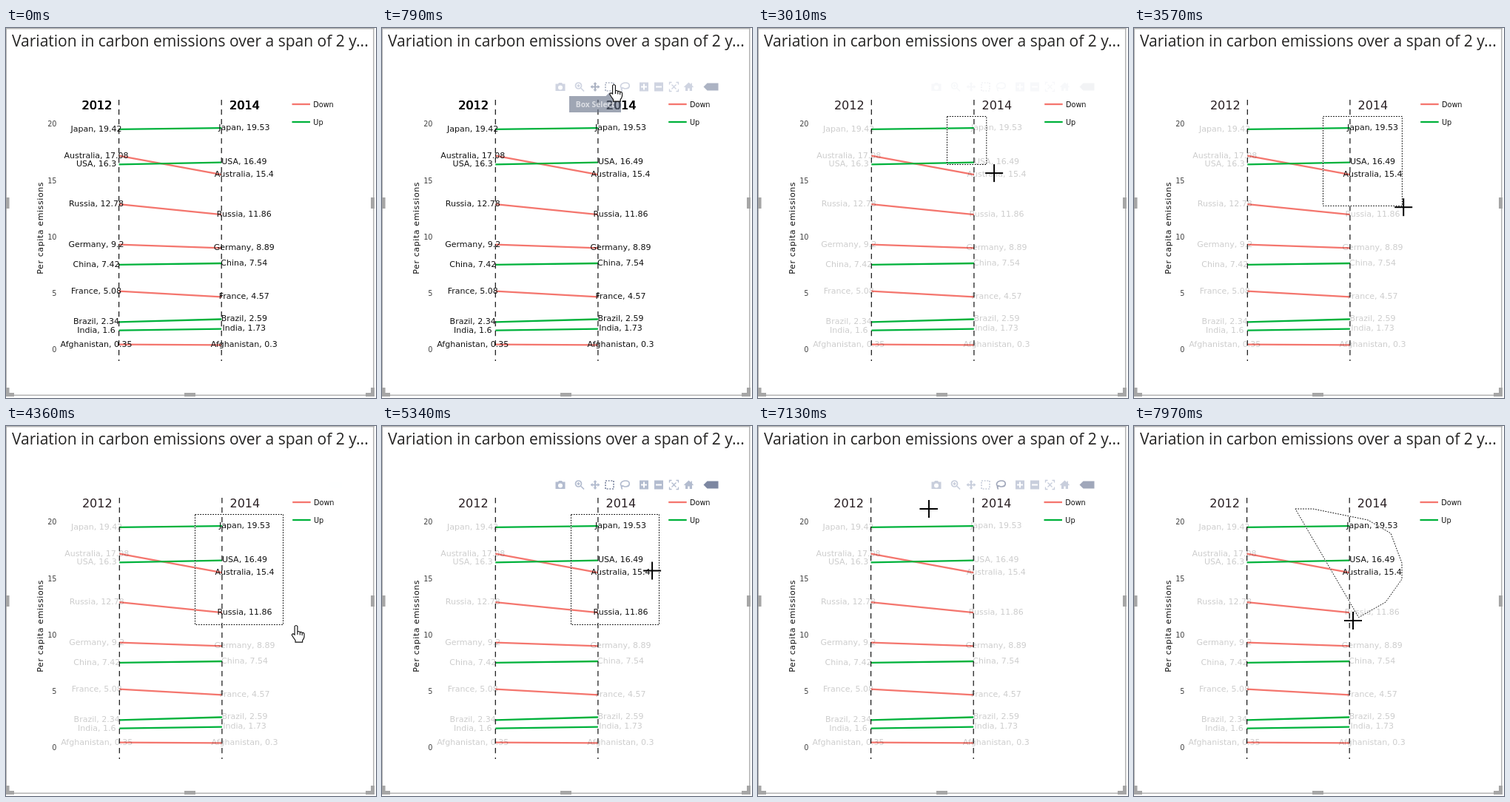
An HTML page with a canvas for the animation above (8 s loop, 500 by 500 pixels).

```html
<!DOCTYPE html>
<html lang="en">
<head>
<meta charset="utf-8">
<title>Carbon emissions</title>
<style>
  html, body { margin: 0; width: 100%; height: 100%; overflow: hidden; background: #fff; }
  canvas { display: block; width: 500px; height: 500px; }
</style>
</head>
<body>
<canvas id="stage" width="500" height="500"></canvas>
<script>
const ctx = document.getElementById('stage').getContext('2d');
const LOOP = 8000;
const RED = '#f4766e', GREEN = '#00b23c', INK = '#111';
const LEFT = 152.6, RIGHT = 291.2;
const BOX_START = 2720, RELEASE = 4360, LASSO_START = 7050;
const sans = size => `${size}px "DejaVu Sans", Verdana, sans-serif`;

const rows = [
  ['Japan', 19.42, 19.53], ['Australia', 17.08, 15.4], ['USA', 16.3, 16.49],
  ['Russia', 12.78, 11.86], ['Germany', 9.2, 8.89], ['China', 7.42, 7.54],
  ['France', 5.08, 4.57], ['Brazil', 2.34, 2.59], ['India', 1.6, 1.73],
  ['Afghanistan', 0.35, 0.3]
];

// Keyframes: time, then values
const pointer = [
  [370, 498, 40], [700, 314, 76], [2090, 314, 76], [2500, 267, 113], [BOX_START, 255, 120],
  [2880, 280, 152], [3010, 319, 196], [3300, 350, 228], [3720, 372, 250], [4030, 392.5, 269],
  [5100, 392.5, 269], [5720, 322, 80], [6380, 322, 80], [6400, 320, 81],
  [6870, 218, 112], [LASSO_START, 218, 112], [7200, 242, 112], [7400, 316, 127],
  [7540, 347, 145], [7690, 362, 185], [7770, 362, 207], [7860, 340, 238], [7970, 296, 263]
];
const barFade = [
  [0, 0], [600, 0], [900, 1], [2750, 1], [3040, 0],
  [RELEASE, 0], [4660, 1], [LASSO_START, 1], [7350, 0]
];

function track(keys, t) {
  if (t <= keys[0][0]) return keys[0].slice(1);
  const next = keys.findIndex(k => k[0] > t);
  if (next < 0) return keys[keys.length - 1].slice(1);
  const a = keys[next - 1], b = keys[next], p = (t - a[0]) / (b[0] - a[0]);
  return a.slice(1).map((v, i) => v + (b[i + 1] - v) * p);
}

const between = (t, a, b) => t >= a && t < b;
const yOf = v => 433 - 15.25 * v;

function text(str, x, y, font, color = INK, align = 'left') {
  ctx.font = font;
  ctx.fillStyle = color;
  ctx.textAlign = align;
  ctx.fillText(str, x, y);
}

function line(x1, y1, x2, y2, color, width, dash = []) {
  ctx.strokeStyle = color;
  ctx.lineWidth = width;
  ctx.setLineDash(dash);
  ctx.beginPath();
  ctx.moveTo(x1, y1);
  ctx.lineTo(x2, y2);
  ctx.stroke();
  ctx.setLineDash([]);
}

function rect(x, y, w, h, color) {
  ctx.fillStyle = color;
  ctx.fillRect(x, y, w, h);
}

function drawPanel() {
  rect(0, 0, 500, 500, '#fff');
  const edge = '#b4b4b4', grip = '#a6a6a6';
  rect(0, 0, 498, 1.5, edge);
  rect(0, 0, 1, 497, edge);
  rect(496, 0, 1.5, 497, edge);
  rect(0, 495.5, 498, 1.5, edge);
  rect(0, 229, 4.5, 15, grip);
  rect(493, 229, 5, 15, grip);
  rect(241, 493, 15, 5, grip);
  rect(0, 493, 11, 5, grip);
  rect(0, 486, 4.5, 12, grip);
  rect(486, 493, 12, 5, grip);
  rect(493, 486, 5, 12, grip);
  text('Variation in carbon emissions over a span of 2 y...', 8, 25,
    '21px "Open Sans", "Noto Sans", sans-serif', '#252423');
}

// Area picked so far by the box or lasso drag
function selection(t) {
  const path = new Path2D();
  if (between(t, BOX_START, LASSO_START)) {
    const [x, y] = track(pointer, Math.min(t, RELEASE) - 35);
    path.rect(255.5, 119.5, Math.max(0, Math.min(x, 374.5) - 255.5), Math.max(0, Math.min(y, 268.5) - 119.5));
  } else if (t >= LASSO_START) {
    const end = t - 20;
    const points = pointer.filter(k => between(k[0], LASSO_START, end)).map(k => k.slice(1));
    points.push(track(pointer, Math.max(end, LASSO_START)));
    points.forEach(([x, y]) => path.lineTo(x, y));
    path.closePath();
  }
  return path;
}

function drawChart(t) {
  const dimmed = t >= 2900;
  const lag = t >= LASSO_START ? Math.max(LASSO_START, t - 50) : t - 80;
  const picked = selection(lag);

  for (let v = 0; v <= 20; v += 5) text(v, 68.5, yOf(v) + 5.3, sans(9.7), '#444', 'right');
  ctx.save();
  ctx.translate(50.4, 270.3);
  ctx.rotate(-Math.PI / 2);
  ctx.letterSpacing = '0.6px';
  text('Per capita emissions', 0, 0, sans(11), INK, 'center');
  ctx.restore();

  ctx.save();
  const shifted = between(t, 370, 2090) || between(t, 2930, 6460);
  ctx.translate(shifted ? 0.7 : 0, 0);
  for (const [, a, b] of rows) {
    line(LEFT, yOf(a), RIGHT, yOf(b), b < a ? RED : GREEN, 2.3);
  }
  for (const x of [LEFT, RIGHT]) line(x, 97, x, 450, '#111', 1.2, [7.2, 5.8]);

  for (const [name, a, b] of rows) {
    const lit = !dimmed || ctx.isPointInPath(picked, RIGHT, yOf(b));
    const faded = 'rgba(0,0,0,0.2)';
    text(`${name}, ${a}`, 122, yOf(a) + 3, sans(11), dimmed ? faded : INK, 'center');
    text(`${name}, ${b}`, 321.8, yOf(b) + 2.6, sans(11), lit ? INK : faded, 'center');
  }
  // Overlapping labels look heavier until they are dimmed
  for (let i = 0; i < (dimmed ? 1 : 3); i++) {
    const nudge = i * 0.35;
    text('2012', 102.2 + nudge, 110, sans(16), dimmed ? '#2a2024' : '#000');
    text('2014', 301.8 + nudge, 110, sans(16), dimmed ? '#2a2024' : '#000');
  }
  line(386.5, 103, 411, 103, RED, 2.3);
  line(386.5, 127, 411, 127, GREEN, 2.3);
  text('Down', 415.3, 107, sans(9.7));
  text('Up', 415.3, 131, sans(9.7));
  ctx.restore();
}

const square = 'M-6-6H6V6H-6Z';
const icons = [
  { x: 241, fill: 'M-6.5-4H-3L-2-5.5H2L3-4H6.5V5.5H-6.5ZM-3 1a3 3 0 1 0 6 0a3 3 0 1 0-6 0Z' },
  { x: 267, stroke: 'M-5.5-1.5a4 4 0 1 0 8 0a4 4 0 1 0-8 0M2 2L6 6M-3.5-1.5H.5M-1.5-3.5V.5' },
  { x: 288, on: t => t < 1580,
    fill: 'M-6.5 0L-3.5-2.5V-1H-1V-3.5H-2.5L0-6.5L2.5-3.5H1V-1H3.5V-2.5L6.5 0L3.5 2.5V1H1V3.5H2.5L0 6.5L-2.5 3.5H-1V1H-3.5V2.5Z' },
  { x: 307.5, on: t => between(t, 650, 6030), stroke: 'M-5.5-5.5H5.5V5.5H-5.5Z', dash: [2, 1.67] },
  { x: 328, on: t => t > 5650,
    stroke: 'M-3 2.5C-8 0-5-5.5 1-5.5C8-5.5 8 2.5 1 2.5C-1 2.5-2 1-4 1.5C-6 3-3 4-4 6' },
  { x: 354, fill: square + 'M-1-4V-1H-4V1H-1V4H1V1H4V-1H1V-4Z' },
  { x: 374, fill: square + 'M-4-1V1H4V-1Z' },
  { x: 394.5, width: 1.3, stroke: 'M-3-3L3 3M3-3L-3 3M-6-3V-6H-3M3-6H6V-3M6 3V6H3M-3 6H-6V3' },
  { x: 414.5, fill: 'M-6.5 0L0-6L3-3.2V-5H4.5V-1.8L6.5 0L5.5 1L4.5 0V5.5H1.2V2H-1.2V5.5H-4.5V0L-5.5 1Z' },
  { x: 445, on: () => true, fill: 'M-10.5 0L-5.5-5H9.5V5H-5.5Z' }
];

function drawTip(label, x, right, width) {
  rect(right - width, 92, width, 22, '#69738a');
  ctx.beginPath();
  ctx.moveTo(x - 5, 92);
  ctx.lineTo(x, 87);
  ctx.lineTo(x + 5, 92);
  ctx.fill();
  text(label, right - width / 2, 106.5, 'bold 10.3px "Open Sans", sans-serif', '#fff', 'center');
}

function drawToolbar(t) {
  const [alpha] = track(barFade, t);
  if (!alpha) return;
  ctx.save();
  ctx.globalAlpha = alpha;
  for (const icon of icons) {
    const color = icon.on && icon.on(t) ? '#7d87a1' : '#b3bccf';
    ctx.save();
    ctx.translate(icon.x, 79.5);
    if (icon.fill) {
      ctx.fillStyle = color;
      ctx.fill(new Path2D(icon.fill), 'evenodd');
    } else {
      ctx.strokeStyle = color;
      ctx.lineWidth = icon.width || 1.7;
      ctx.setLineDash(icon.dash || []);
      ctx.stroke(new Path2D(icon.stroke));
    }
    ctx.restore();
  }
  if (between(t, 650, 2130)) drawTip('Box Select', 307.5, 323, 70);
  if (between(t, 5650, 6470)) drawTip('Lasso Select', 328, 343, 78);
  ctx.restore();
}

function drawSelection(t) {
  const path = selection(t);
  ctx.lineWidth = 1;
  ctx.strokeStyle = '#fff';
  ctx.stroke(path);
  ctx.strokeStyle = '#000';
  ctx.setLineDash([1.7, 1.7]);
  ctx.stroke(path);
  ctx.setLineDash([]);
}

const hand = new Path2D('M-2 1.5Q0-1.5 2 1.5V9Q4 7.5 5.5 9.5Q7.5 8.5 8.5 10.5Q11 9.5 11.5 12' +
  'V16Q11 19 9 21V23.5H-1V21Q-4 17-6 13.5Q-5 10.5-2 13ZM2 9V13M5.5 10V13.5M8.5 11V14');

function drawPointer(t) {
  if (t < 370) return;
  const [x, y] = track(pointer, t);
  const dragging = between(t, BOX_START, RELEASE) || t >= LASSO_START;
  const overPlot = t > 2090 && x < 375 && y > 92;
  if (dragging || overPlot) {
    line(x - 12, y, x + 12, y, '#000', 2);
    line(x, y - 12, x, y + 12, '#000', 2);
    return;
  }
  ctx.save();
  ctx.translate(x - 0.5, y + 0.5);
  ctx.scale(0.96, 0.96);
  ctx.fillStyle = '#fff';
  ctx.fill(hand);
  ctx.strokeStyle = '#111';
  ctx.lineWidth = 1.2;
  ctx.stroke(hand);
  ctx.restore();
}

function frame(now) {
  const t = now % LOOP;
  drawPanel();
  drawChart(t);
  drawSelection(t);
  drawToolbar(t);
  drawPointer(t);
  requestAnimationFrame(frame);
}
requestAnimationFrame(frame);
</script>
</body>
</html>
```
